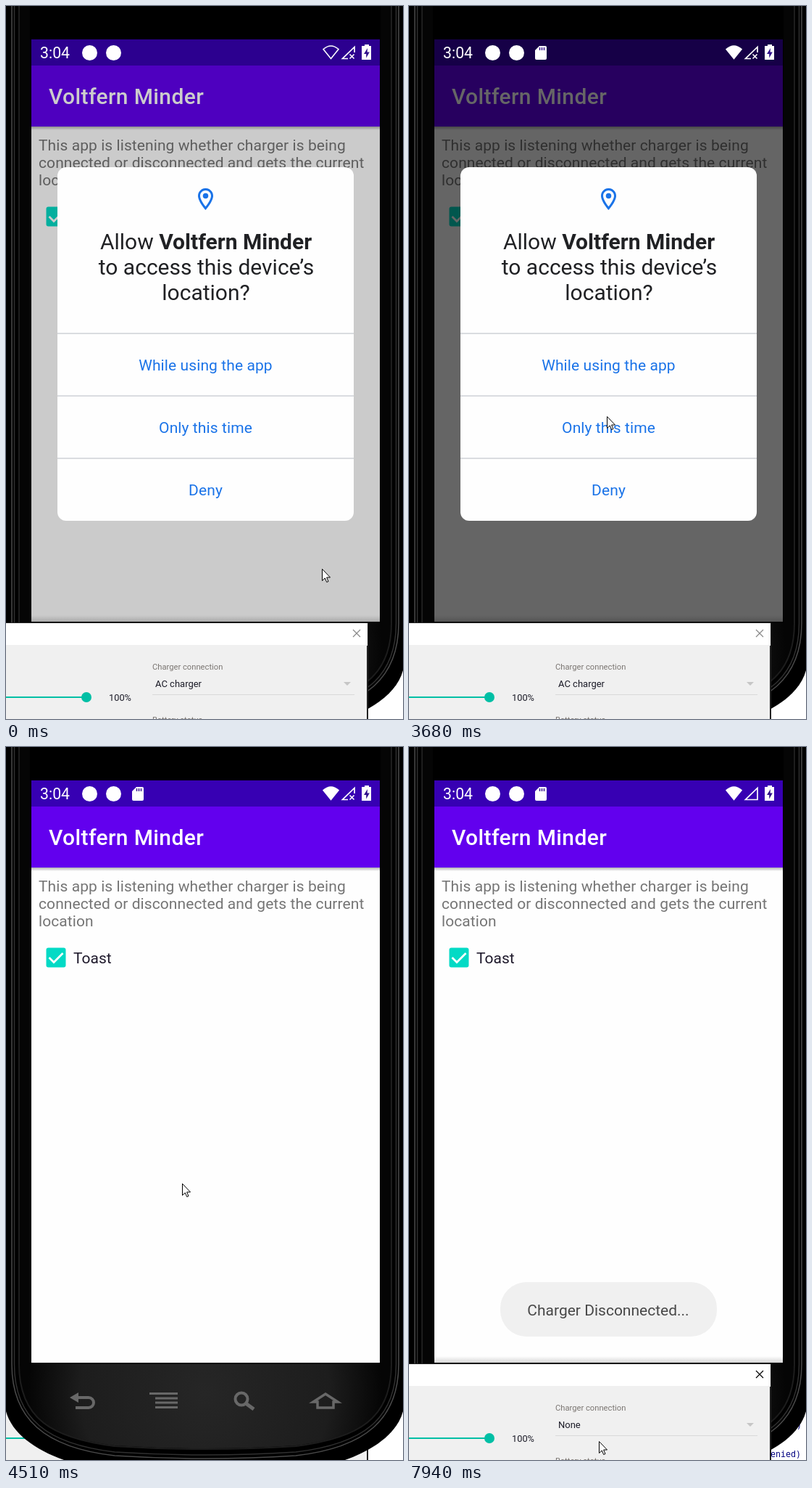
Animation of 548x982 px, one loop 8000 ms. Source, as an HTML page:

```html
<!DOCTYPE html>
<html lang="en">
<head>
<meta charset="utf-8">
<style>
  html, body { margin: 0; width: 100%; height: 100%; overflow: hidden; background: #fff; }
  svg { display: block; width: 548px; height: 982px; font-family: Roboto, "Noto Sans", sans-serif; }
  .mono { font: 11.6px "DejaVu Sans Mono", monospace; fill: #000080; }
</style>
</head>
<body>
<svg id="stage" viewBox="0 0 548 982" xmlns="http://www.w3.org/2000/svg"></svg>
<script>
const LOOP = 8000;
const APP = 'Voltfern Minder';
const stage = document.getElementById('stage');

const text = (x, y, size, fill, content, extra = '') =>
  `<text x="${x}" y="${y}" font-size="${size}" fill="${fill}" ${extra}>${content}</text>`;
const rect = (x, y, w, h, fill, extra = '') =>
  `<rect x="${x}" y="${y}" width="${w}" height="${h}" fill="${fill}" ${extra}/>`;
const middle = 'text-anchor="middle"';

// Bezel contour: inset from the left and right, and its lowest y
const contour = (inset, low) => {
  const right = 550 - inset;
  return `M${inset} -9V850C${inset} 925 ${inset + 45} ${low - 16} 150 ${low - 5}
    Q275 ${low + 3} 400 ${low - 5}C${right - 45} ${low - 16} ${right} 925 ${right} 850V-9`;
};
const bezelLine = (inset, low, color, width) =>
  `<path d="${contour(inset, low)}" fill="none" stroke="${color}" stroke-width="${width}"/>`;

const navKeys = `
  <g fill="none" stroke="#686868" stroke-width="4">
    <path d="M98 896H114a7 7 0 0 1 0 14H96"/>
    <path d="M88 896L100 889V903Z" fill="#686868" stroke="none"/>
    <path d="M198 890.5H237M206 897H237M206 903H237M206 909.5H237" stroke-width="3"/>
    <circle cx="325" cy="898" r="8.5"/><path d="M331 904L342 912" stroke-width="5"/>
    <path d="M441 891L458 902H452V910H430V902H424Z" stroke-width="3.5"/>
  </g>`;

const statusIcons = `
  ${text(47, 72, 21.3, '#fff', '3:04')}
  <g fill="#fff">
    <circle cx="115.5" cy="64.5" r="10.5"/><circle cx="148.500" cy="64.5" r="10.5"/>
    <g id="card">
      <path d="M180 55H188Q190 55 190 57V72Q190 74 188 74H176Q174 74 174 72V61Z"/>
      <path d="M180.500 57v4M183.500 57v4M186.500 57v4" stroke="#3a1690" stroke-width="1.5"/>
    </g>
    <path id="wifi" d="M448.500 72.500L438 59.500Q448.500 50.500 459 59.500Z" stroke="#fff" stroke-width="1.500"/>
    <path id="signal" fill="none" stroke="#fff" stroke-width="1.700"/>
    <path id="noSignal" d="M474.500 66.500l6 6m0-6l-6 6" stroke="#fff" stroke-width="1.600"/>
    <path d="M495 53H501V55H504V74H491V55H495Z"/>
    <path d="M499 58L494 66H497.200V71.500L501.800 63.500H498.600Z" fill="#30108a"/>
  </g>`;

const appPage = `
  ${rect(35, 46, 481, 802, '#fefefe')}
  ${rect(35, 166, 481, 5, 'url(#barShade)')}
  ${rect(35, 82, 481, 84, '#6200ee')}
  ${rect(35, 46, 481, 36, '#3700b3')}
  ${text(59, 135, 30, '#fff', APP, 'font-weight="500" letter-spacing=".35"')}
  ${['This app is listening whether charger is being',
     'connected or disconnected and gets the current',
     'location'].map((line, i) =>
       text(45, 199 + i * 24.2, 21, '#757575', line, 'letter-spacing=".08"')).join('')}
  ${rect(55.5, 276.5, 27, 27, '#03dac5', 'rx="3"')}
  <path d="M59.500 290L66 296.500L78.500 284" fill="none" stroke="#fff" stroke-width="2.700"/>
  ${text(93, 298, 21, '#1f1a2c', 'Toast')}`;

const dialog = `
  <g id="dialog">
    ${rect(71, 222, 409, 487, '#fefefe', 'rx="12"')}
    <g transform="translate(257.500 248) scale(1.5)" fill="#1a73e8">
      <path fill-rule="evenodd" d="M12 2C8.130 2 5 5.130 5 9c0 5.250 7 13 7 13s7-7.750 7-13c0-3.870-3.130-7-7-7z
        M7 9c0-2.760 2.240-5 5-5s5 2.240 5 5c0 2.880-2.880 7.190-5 9.880C9.920 16.210 7 11.850 7 9z"/>
      <circle cx="12" cy="9" r="2.500"/>
    </g>
    ${text(276, 335, 30, '#202124', `Allow <tspan font-weight="700">${APP}</tspan>`, middle)}
    ${text(276.5, 370, 30, '#202124', 'to access this device’s', middle)}
    ${text(276, 405, 30, '#202124', 'location?', middle)}
    ${['While using the app', 'Only this time', 'Deny'].map((label, i) =>
      rect(71, 450 + i * 86, 409, 2, '#dadce0') +
      text(275.5, 502 + i * 86, 21, '#1a73e8', label, middle + ' letter-spacing=".1"')).join('')}
  </g>`;

const toast = `
  <g id="toast">
    ${rect(126, 737, 299, 75, '#f0f0f0', 'rx="36"')}
    ${text(275, 783, 21, '#484848', 'Charger Disconnected...', middle)}
  </g>`;

const phone = `
  <path d="M0 0H548V915C540 945 508 968 468 982H80C40 968 8 945 0 915Z"/>
  <path d="${contour(18, 967)}Z" fill="url(#face)"/>
  ${bezelLine(8, 981, '#4a4a4a', 1.5)}
  ${bezelLine(11.5, 976, '#303030', 1.5)}
  ${bezelLine(18, 968, '#1d1d1d', 2)}
  ${rect(33, 0, 484, 850, '#000')}
  ${navKeys}
  <g clip-path="url(#screen)">
    ${appPage}
    ${rect(35, 46, 481, 802, '#000', 'id="dim"')}
    ${dialog}${toast}
  </g>
  ${statusIcons}`;

const panel = `
  ${rect(-5, 849, 505, 140, '#222')}
  ${rect(0, 850, 499, 31, '#fff')}
  ${rect(0, 880, 498, 102, '#f0f0f0')}
  <path id="close" d="M479 859l10 10m0-10l-10 10" stroke-width="1.200"/>
  ${rect(0, 951, 111, 2, '#00bfa5')}<circle cx="111" cy="952" r="7" fill="#00bfa5"/>
  ${text(142, 957, 12.8, '#1c1c28', '100%')}
  ${text(202, 914, 11.2, '#7b7672', 'Charger connection')}
  ${text(206, 938, 13, '#1c1c28', '', 'id="choice"')}
  <path d="M466 931H476L471 936Z" fill="#c6c6c6"/>
  ${rect(202, 948, 279, 1, '#d9d9d9')}
  ${text(202, 987, 11.2, '#7b7672', 'Battery status')}
  <g id="menu">
    ${rect(202, 928, 280, 60, '#fff', 'stroke="#ddd"')}
    ${text(206, 955, 13, '#1c1c28', 'None')}
    ${text(206, 984, 13, '#1c1c28', 'AC charger')}
  </g>`;

stage.innerHTML = `
  <defs>
    <linearGradient id="barShade" x2="0" y2="1">
      <stop stop-opacity=".3"/><stop offset="1" stop-opacity="0"/>
    </linearGradient>
    <linearGradient id="panelShade" x2="0" y2="1">
      <stop stop-opacity="0"/><stop offset="1" stop-opacity=".16"/>
    </linearGradient>
    <radialGradient id="face" gradientUnits="userSpaceOnUse" cx="275" cy="890" r="245">
      <stop stop-color="#262626"/><stop offset=".7" stop-color="#1d1d1d"/>
      <stop offset="1" stop-color="#050505"/>
    </radialGradient>
    <clipPath id="screen">${rect(35, 46, 481, 802, '#000')}</clipPath>
  </defs>
  ${rect(0, 0, 548, 982, '#fff')}
  ${[535, 521, 499].map((x, i) => `<text class="mono" x="${x}" y="${938 + i * 20}"></text>`).join('')}
  <use href="#panel"/>
  <g>${phone}</g>
  ${rect(35, 839, 481, 9, 'url(#panelShade)', 'id="shade"')}
  <g id="front"><g id="panel">${panel}</g></g>
  <path id="cursor" d="M.5 .5V16.500L4.300 13L6.700 18.500L9 17.500L6.600 12H11.500Z"
    fill="#fff" stroke="#000" stroke-linejoin="round"/>`;

const el = id => document.getElementById(id);
const [dim, dialogBox, toastBox, card, wifi, signal, noSignal, close, choice, menu, shade, front, cursor] =
  ['dim', 'dialog', 'toast', 'card', 'wifi', 'signal', 'noSignal', 'close', 'choice', 'menu',
   'shade', 'front', 'cursor'].map(el);
const under = stage.querySelector('use');
const logRows = [...stage.querySelectorAll('.mono')];
// The panel itself lives in defs so that both layers can show it
stage.querySelector('defs').append(el('panel'));
front.innerHTML = '<use href="#panel"/>';

const cursorPath = [
  [0, 436, 775], [300, 436, 775], [500, 300, 548], [650, 343, 618], [880, 345, 621],
  [1650, 317, 512], [1800, 316, 502], [3230, 316, 502], [3680, 273, 565], [4450, 273, 565],
  [4980, 12, 877], [5209, 12, 877], [5210, -20, 890], [5480, -20, 890], [5950, 240, 927],
  [6300, 255, 940], [6770, 262, 952], [6850, 262, 953], [7000, 262, 956], [LOOP, 262, 956]];

const log = [
  [0, '', '', ''], [570, '', '', 'dm-5 ::'], [880, '', 'dm-5', 'app:s0:'],
  [1100, '', '', 'c=app:'], [1650, '', '', 'ctx=u:'], [2730, '', '', ''],
  [6550, '', '', 'enied)'], [6770, 'in', '', 'enied)'], [7640, ')', '', 'enied)']];

const clamp = v => Math.min(1, Math.max(0, v));
const progress = (t, from, to) => clamp((t - from) / (to - from));
const show = (node, on) => node.setAttribute('display', on ? 'inline' : 'none');
const fade = (node, v) => node.setAttribute('opacity', v);

function along(path, t) {
  const i = Math.max(1, path.findIndex(key => key[0] > t));
  const a = path[i - 1], b = path[i], p = progress(t, a[0], b[0]);
  return [a[1] + (b[1] - a[1]) * p, a[2] + (b[2] - a[2]) * p];
}

function render(t) {
  const leave = progress(t, 3950, 4280);
  const darken = t < 70 ? 0 : Math.floor(1 + progress(t, 70, 190) * 2) / 3;
  fade(dim, (0.2 + 0.4 * darken) * (1 - leave));
  fade(dialogBox, clamp(1 - leave * 1.27));
  dialogBox.setAttribute('transform', `translate(0 ${338 * (leave / 0.758) ** 2})`);

  show(card, t >= 2350);
  wifi.setAttribute('fill', t < 500 ? 'none' : '#fff');
  const connected = t >= 4700;
  show(noSignal, !connected);
  signal.setAttribute('d', connected ? 'M464.500 72.500H481V56.500Z' : 'M472 72.500H464.500L481 56.500V64');

  const panelFront = t < 3830 || t >= 5210;
  show(front, panelFront);
  show(shade, panelFront);
  show(under, !panelFront);
  close.setAttribute('stroke', t < 5210 ? '#888' : '#000');
  choice.textContent = t < 6380 ? 'AC charger' : 'None';
  show(menu, t >= 6060 && t < 6380);
  fade(toastBox, progress(t, 7580, 7940));

  const lines = log.filter(entry => entry[0] <= t).pop();
  logRows.forEach((row, i) => { row.textContent = lines[i + 1]; });

  const [x, y] = along(cursorPath, t).map(Math.round);
  cursor.setAttribute('transform', `translate(${x} ${y})`);
}

const start = performance.now();
function tick() {
  render((performance.now() - start) % LOOP);
  requestAnimationFrame(tick);
}
tick();
</script>
</body>
</html>
```
